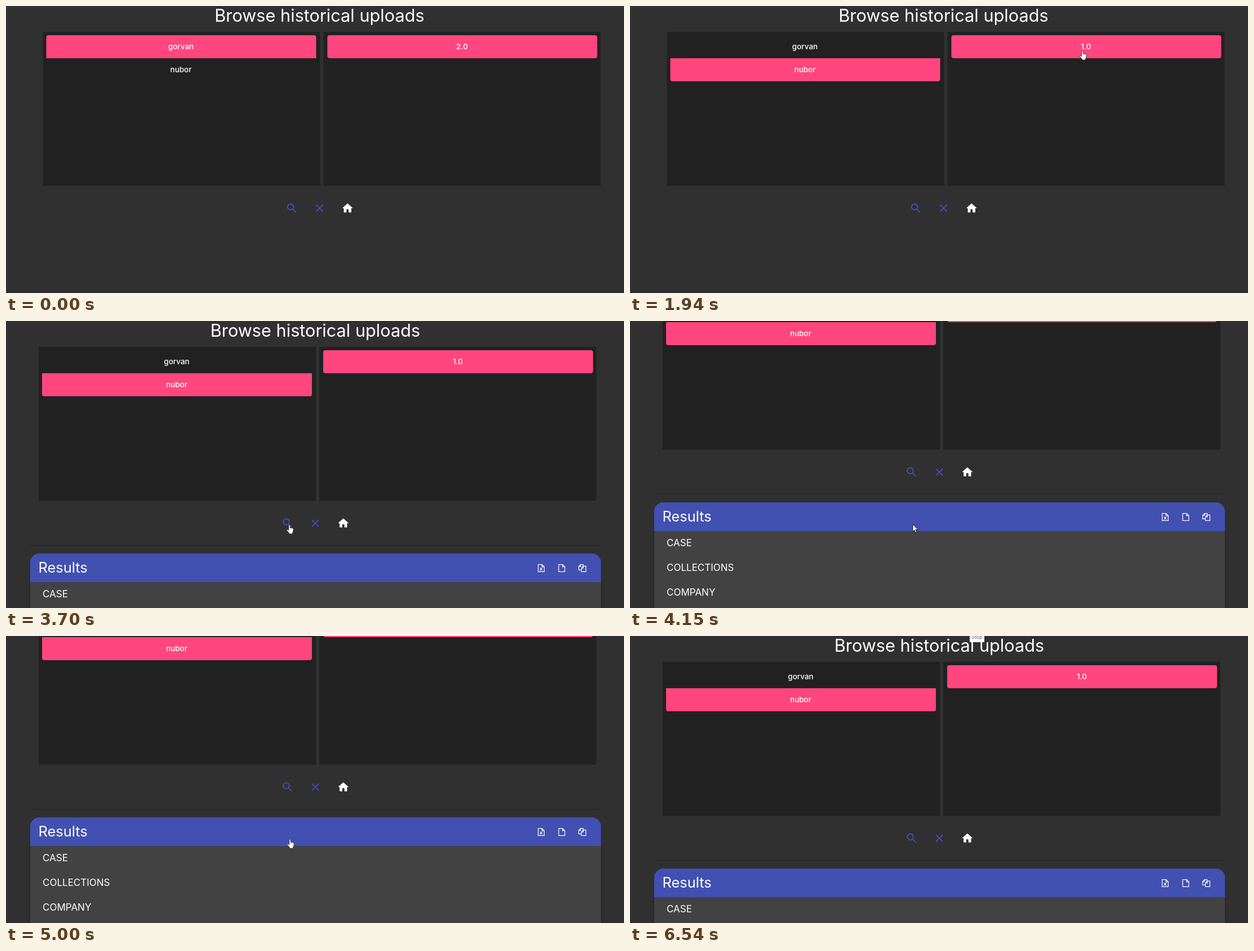
These frames come from a looping animation (1097x511 px, 6640 ms). An HTML page:

```html
<!DOCTYPE html>
<html lang="en">
<head>
<meta charset="utf-8">
<title>Browse historical uploads</title>
<style>
  html, body { margin: 0; width: 100%; height: 100%; overflow: hidden; background: #303030; }
  body { position: relative; color: #fff; font-family: Inter, "Open Sans", sans-serif; }
  div, svg { position: absolute; }
  svg { overflow: visible; }
  #page { left: 0; top: 0; width: 1097px; height: 1000px; }
  #title { left: 49px; width: 1000px; top: -3px; font-size: 30.7px; line-height: 40px; text-align: center; }
  .panel { top: 46px; width: 492px; height: 274px; background: #212121; }
  .item { left: 6px; width: 479px; height: 41px; font-size: 13.5px; font-weight: 500; line-height: 41px; text-align: center; }
  .on { background: #ff467d; }
  #hr { left: 43px; top: 398.5px; width: 1013px; height: 1px; background: #252525; }
  #card { left: 43px; top: 414px; width: 1013px; height: 75px; border-radius: 16px 16px 0 0; background: #424242; }
  #head { left: 0; top: 0; width: 100%; height: 51px; border-radius: 16px 16px 0 0; background: #4250b1; }
  #head div { left: 14.5px; font-size: 25.4px; line-height: 50px; }
  #rows { left: 0; top: 51px; width: 100%; height: 600px; background: #424242;
    box-shadow: 0 3px 1px -2px rgba(0,0,0,.2), 0 2px 2px rgba(0,0,0,.14), 0 1px 5px rgba(0,0,0,.3); }
  .row { left: 0; width: 100%; height: 42px; padding-left: 22px; box-sizing: border-box; font-size: 17px; line-height: 43px; }
  .hover { background: #4a4a4a; }
  #tip { left: 460px; top: 390px; width: 79px; height: 24px; border-radius: 4px; background: #616161;
    font-size: 9.5px; font-weight: 500; line-height: 24px; text-align: center; white-space: nowrap; }
  #stop { left: 603px; top: 0; width: 26px; height: 11px; overflow: hidden; background: #fff; color: #666; }
  #stop div { left: 0; top: -5px; width: 26px; font-size: 9px; line-height: 13px; text-align: center; }
</style>
</head>
<body>
<div id="page">
  <div id="title">Browse historical uploads</div>
  <div class="panel" style="left:57.5px">
    <div class="item" id="first" style="top:6px;border-radius:4px 4px 0 0">gorvan</div>
    <div class="item" id="second" style="top:47px;border-radius:0 0 4px 4px">nubor</div>
  </div>
  <div class="panel" style="left:555.5px">
    <div class="item on" id="version" style="left:7px;top:6px;border-radius:4px"></div>
  </div>
  <svg id="tools" width="1" height="1" style="left:0;top:0">
    <g fill="#4250b8">
      <path transform="translate(488.5 348.6) scale(.95)" d="M15.5 14h-.79l-.28-.27A6.5 6.5 0 1 0 13.73 14.43l.27.28v.79l5 4.99L20.49 19zM9.5 14a4.5 4.5 0 1 1 0-9 4.5 4.5 0 0 1 0 9z"/>
      <path transform="translate(537.7 348.6) scale(.95)" d="M19 6.41L17.59 5 12 10.59 6.41 5 5 6.41 10.59 12 5 17.59 6.41 19 12 13.41 17.59 19 19 17.59 13.41 12z"/>
    </g>
    <path fill="#fff" transform="translate(587.4 348.6) scale(.95)" d="M10 20v-6h4v6h5v-8h3L12 3 2 12h3v8z"/>
  </svg>
  <div id="hr"></div>
  <div id="card">
    <div id="rows"></div>
    <div id="head">
      <div>Results</div>
      <svg width="1" height="1" style="left:0;top:0" fill="none" stroke="#fff" stroke-width="1.2">
        <path id="sheet" transform="translate(901 19)" d="M.6.6h6.8l4 4v8.8H.6zM7.4.6v4h4M3.6 6.4l4.4 5m0-5l-4.4 5"/>
        <path transform="translate(937.5 19)" d="M.6.6h6.8l4 4v8.8H.6zM7.4.6v4h4"/>
        <path transform="translate(973 19)" d="M5.4 10.4H.6V4.2L4 .6h4.4v2.6M4 .6v3.6H.6M8.8 3.4h4.6v10H5.4V7zM8.8 3.4V7H5.4"/>
      </svg>
    </div>
  </div>
  <div id="tip">Search history</div>
</div>
<div id="stop"><div>Stop</div></div>
<svg id="arrow" width="1" height="1" style="left:0;top:0">
  <path fill="#fff" stroke="#111" stroke-width=".9" d="M0 0v13l3-2.8 2 4.6 2-.9-2-4.4h4z"/>
</svg>
<svg id="hand" width="1" height="1" style="left:0;top:0">
  <path transform="translate(-5.5 0)" fill="#fff" stroke="#222" stroke-width=".8"
    d="M4.3 1.8C4.3.4 6.7.4 6.7 1.8V6l4.5 1c1.2.3 1.6 1 1.5 2l-.6 4.2-1 2v1.8H5v-1.5L1 10.8C.3 9.6 1.6 8.6 2.8 9.5L4.3 11z"/>
</svg>
<script>
const LOOP = 6640;
const $ = id => document.getElementById(id);
const names = ["CASE", "COLLECTIONS", "COMPANY", "COURTS", "DEBTOR_PAYMENTS",
  "EVENT", "INSURANCE", "PARTY", "PAST_EVENT", "PEOPLE"];
const rows = names.map((name, i) => {
  const row = document.createElement("div");
  row.className = "row";
  row.textContent = name;
  row.style.top = i * 43.8 + "px";
  $("rows").append(row);
  return row;
});

const arrow = (x, y) => ({ cursor: "arrow", x, y });
const hand = (x, y) => ({ cursor: "hand", x, y });

// Each step keeps the earlier state and changes what it lists.
const steps = [
  [0, { cursor: "", x: 0, y: 0, first: true, second: false, version: "2.0",
        tip: 0, card: 0, scroll: 0, hover: -1, stop: false }],
  [100, arrow(751, 250)],
  [210, arrow(702, 240)],
  [320, arrow(620, 222)],
  [420, arrow(520, 197)],
  [530, arrow(430, 168)],
  [630, arrow(365, 147)],
  [740, arrow(339, 140)],
  [860, { ...hand(314, 128), second: true }],
  [960, hand(302, 119)],
  [1290, hand(300, 112)],
  [1380, hand(299, 106)],
  [1520, { ...hand(303, 107), first: false, version: "1.0" }],
  [1940, hand(803, 79)],
  [2070, arrow(772, 120)],
  [2180, arrow(700, 205)],
  [2290, arrow(615, 290)],
  [2380, arrow(545, 345)],
  [2480, hand(503, 362)],
  [2590, { tip: .3 }],
  [2710, { tip: 1 }],
  [3050, { tip: 0 }],
  [3150, { card: 1 }],
  [3700, { card: 2 }],
  [4030, { scroll: 20 }],
  [4150, { ...arrow(502, 362), scroll: 91 }],
  [4260, { scroll: 240 }],
  [4360, { scroll: 365, hover: 5 }],
  [4570, hand(504, 361)],
  [5000, { scroll: 91, hover: -1 }],
  [5140, { ...hand(503, 361), scroll: 0 }],
  [5350, { tip: 1 }],
  [5460, { ...arrow(520, 220), tip: .6 }],
  [5580, { ...arrow(575, 30), tip: 0 }],
  [5690, { cursor: "" }],
  [6540, { stop: true }]
];

const show = (el, on) => { el.style.visibility = on ? "visible" : "hidden"; };

function draw(t) {
  const s = {};
  for (const [at, change] of steps) if (at <= t) Object.assign(s, change);
  // The page sits further left once the scrollbar takes its room.
  const dx = s.card === 2 ? 0 : 7.5;
  $("page").style.transform = `translate(${dx}px, ${-s.scroll}px)`;
  $("first").classList.toggle("on", s.first);
  $("second").classList.toggle("on", s.second);
  $("version").textContent = s.version;
  $("card").style.display = $("hr").style.display = s.card ? "block" : "none";
  $("rows").style.display = s.card === 2 ? "block" : "none";
  rows.forEach((row, i) => row.classList.toggle("hover", i === s.hover));
  $("tip").style.transform = `scale(${s.tip})`;
  show($("tip"), s.tip > 0);
  show($("stop"), s.stop);
  for (const id of ["arrow", "hand"]) {
    show($(id), s.cursor === id);
    $(id).style.transform = `translate(${s.x}px, ${s.y}px)`;
  }
}

function tick() {
  draw(performance.now() % LOOP);
  requestAnimationFrame(tick);
}
tick();
</script>
</body>
</html>
```
